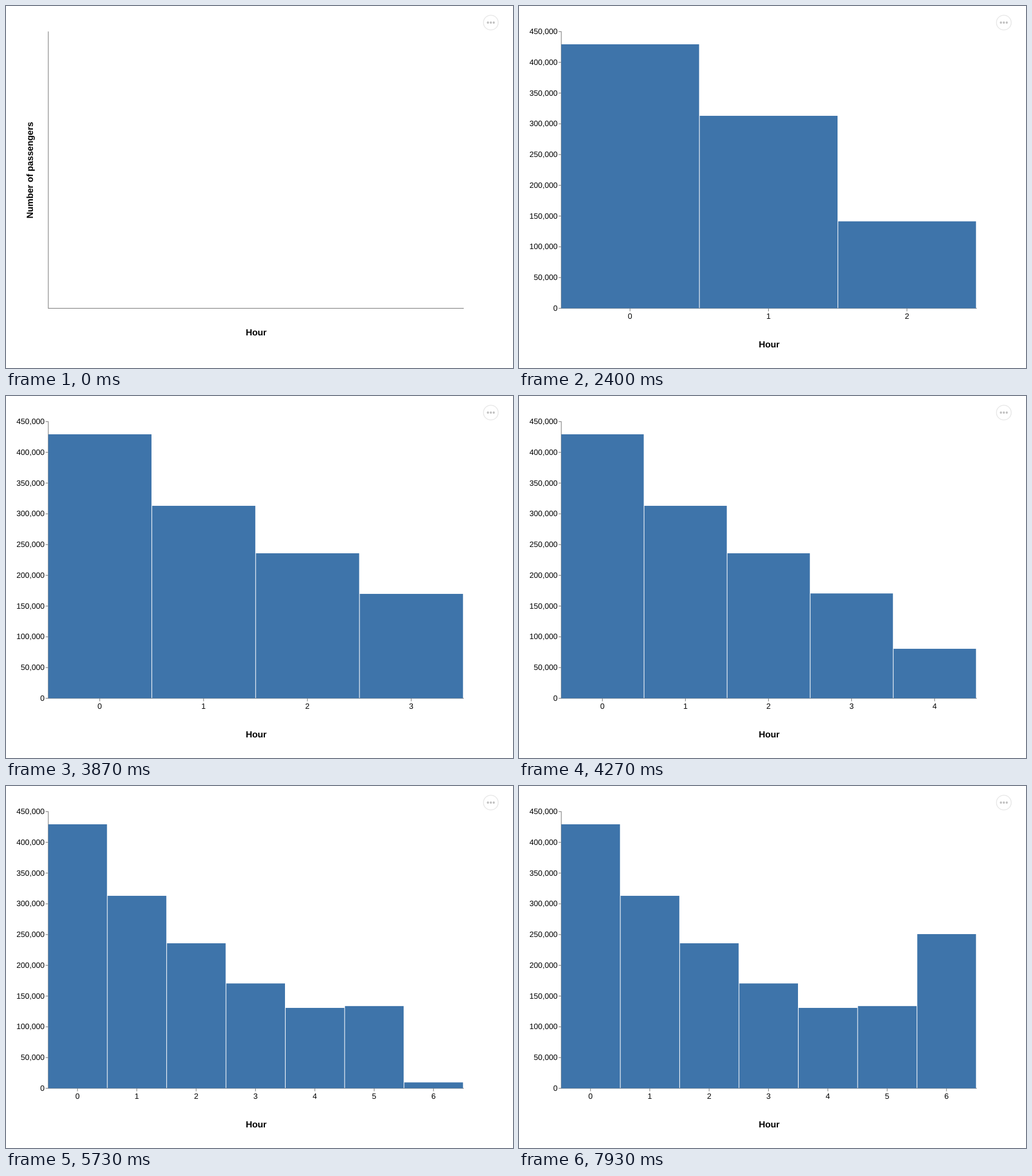
An HTML page that plays this animation: 885x633 px, repeating every 8000 ms.

```html
<!DOCTYPE html>
<html lang="en">
<head>
<meta charset="utf-8">
<title>Passengers per hour</title>
<style>
  html, body { margin: 0; width: 100%; height: 100%; overflow: hidden; background: #fff; }
  svg { display: block; width: 885px; height: 633px; }
  text { font: 13.6px "Liberation Sans", Arial, sans-serif; text-anchor: middle; text-rendering: geometricPrecision; }
  .title { font-size: 15.6px; font-weight: bold; }
  #yAxis text { text-anchor: end; }
  .axis { stroke: #888; stroke-width: 1.2; fill: none; }
  #bars { fill: #3e74aa; }
</style>
</head>
<body>
<svg viewBox="0 0 885 633">
  <path class="axis" d="M73.8 44.6V528.7H799"/>
  <g id="yAxis"></g>
  <g id="xAxis"></g>
  <g id="bars"></g>
  <text class="title" id="yTitle" transform="translate(47 287) rotate(-90)">Number of passengers</text>
  <text class="title" id="xTitle" x="436.7">Hour</text>
  <circle cx="846.3" cy="29" r="12.9" fill="#fff" stroke="#e6e6e6" stroke-width="1.4"/>
  <path d="M841.2 29h11" stroke="#c0c0c0" stroke-width="3.8" stroke-linecap="round" stroke-dasharray="0 5.1"/>
</svg>
<script>
const LOOP = 8000, FIRST_TICK = 36;
const LEFT = 73, WIDTH = 725, BASE = 528.6, GAP = 1.1;
const SCALE = 1.0753; // pixels per thousand passengers

// Thousands of passengers in each full hour; the last hour stays open.
const hourTotals = [429.3, 313, 235.8, 170.5, 130.75, 133.7, Infinity];

// Running count in thousands at a few ticks; a tick is 1/15 s.
const arrivals = [
  [FIRST_TICK, 883.7], [47, 1025.2], [50, 1053.1], [58, 1147.9], [64, 1229.1],
  [69, 1249.6], [74, 1289.2], [101, 1589.4], [107, 1639.1], [119, 1663.8]
];

const [yAxis, xAxis, bars, yTitle, xTitle] =
  ['yAxis', 'xAxis', 'bars', 'yTitle', 'xTitle'].map(id => document.getElementById(id));

function countAt(tick) {
  if (tick < FIRST_TICK) return 0;
  const next = Math.max(1, arrivals.findIndex(([t]) => t >= tick));
  const [t0, v0] = arrivals[next - 1], [t1, v1] = arrivals[next];
  return v0 + (v1 - v0) * (tick - t0) / (t1 - t0);
}

// Passengers fill one hour after another.
function hoursFilled(count) {
  const hours = [];
  for (const total of hourTotals) {
    if (count <= 0) break;
    hours.push(Math.min(count, total));
    count -= total;
  }
  return hours;
}

// Ticks begin on whole hundredths of a second.
function tickAt(time) {
  const tick = Math.floor(time * 0.015 + 0.06);
  return Math.round(tick * 20 / 3) * 10 > time ? tick - 1 : tick;
}

yAxis.innerHTML = Array.from({ length: 10 }, (_, i) => {
  const value = i * 50, y = BASE - value * SCALE;
  const label = (value * 1000).toLocaleString('en-US');
  return `<path class="axis" d="M69 ${y}h5"/><text x="67.4" y="${y + 4.4}">${label}</text>`;
}).join('');

function draw(tick) {
  const hours = hoursFilled(countAt(tick));
  const started = hours.length > 0;
  const step = WIDTH / hours.length;

  yAxis.style.display = started ? '' : 'none';
  yTitle.style.display = started ? 'none' : '';
  xTitle.setAttribute('y', started ? 596.9 : 575.7);

  bars.innerHTML = hours.map((value, i) => {
    const height = value * SCALE;
    return `<rect x="${LEFT + i * step + 0.8}" y="${BASE - height}" width="${step - GAP}" height="${height}"/>`;
  }).join('');
  xAxis.innerHTML = hours.map((_, i) => {
    const x = LEFT + (i + 0.5) * step;
    return `<path class="axis" d="M${x} ${BASE}v5.2"/><text x="${x}" y="546.8">${i}</text>`;
  }).join('');
}

let lastTick = -1;
const start = performance.now();
function frame() {
  const tick = tickAt((performance.now() - start) % LOOP);
  if (tick !== lastTick) draw(lastTick = tick);
  requestAnimationFrame(frame);
}
frame();
</script>
</body>
</html>
```
